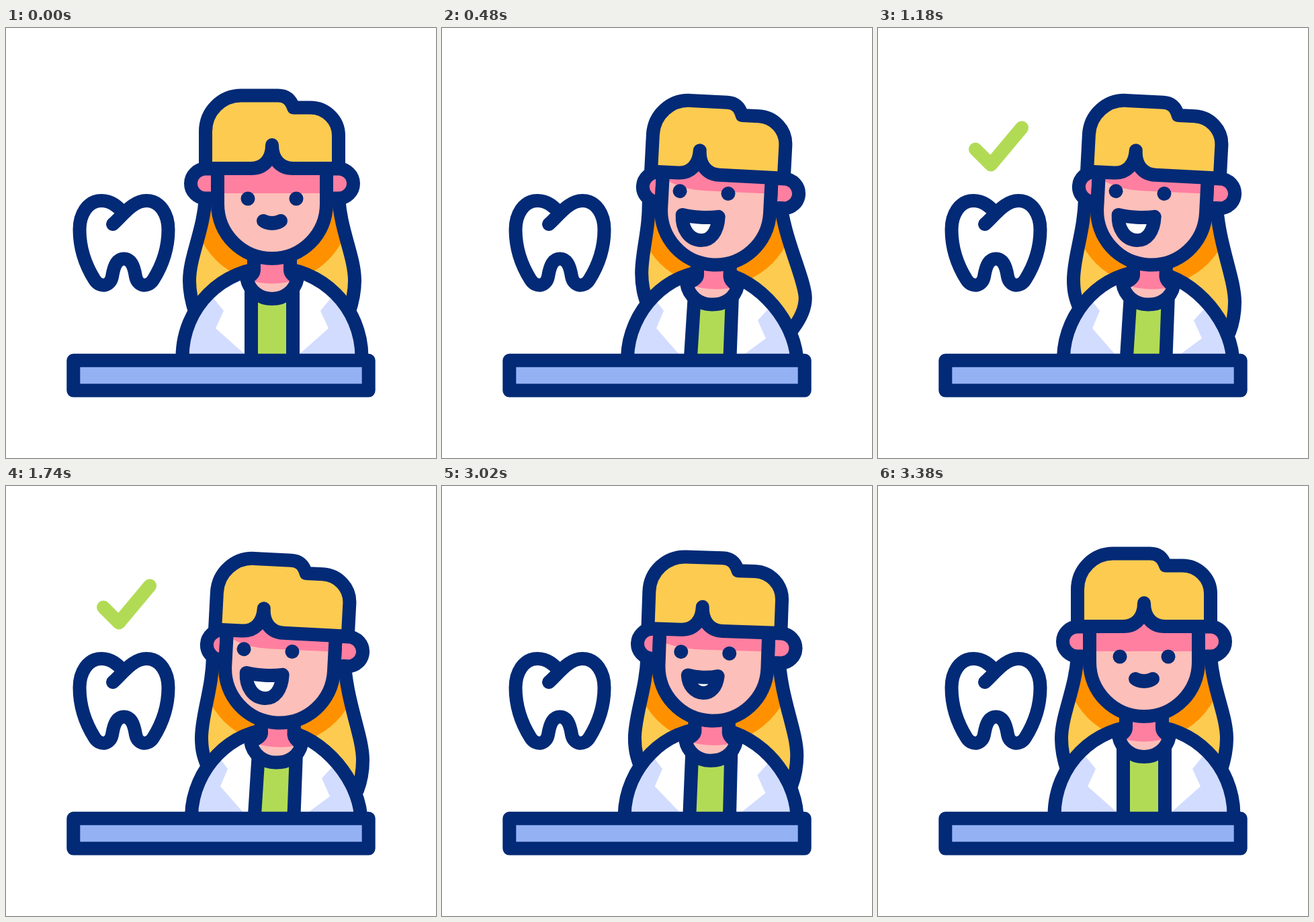
These frames come from a looping animation (640x640 px, 3.6 s). An HTML page:

```html
<!DOCTYPE html>
<html lang="en">
<head>
<meta charset="utf-8">
<title>Dentist</title>
<style>
  html, body { margin: 0; width: 100%; height: 100%; overflow: hidden; background: #fff; }
  svg { display: block; width: 100vw; height: 100vh; }
  path, circle { stroke-linecap: round; stroke-linejoin: round; }
  .line { stroke: #032a76; stroke-width: 20; }
</style>
</head>
<body>
<svg viewBox="0 0 640 640">
  <defs><clipPath id="hairClip"><path id="hairMask"/></clipPath></defs>
  <g id="back"></g>
  <g id="body"></g>
  <g id="head"></g>
  <path class="line" fill="#94b1f4" d="M100.3 494.8H539.7V539.6H100.3Z"/>
  <path id="tooth" fill="none" d="M159 292C172 281 188 257 209 257C230 257 241.5 278 241.5 300C241.5 330 231 356 219 375C211 387 196 385 193 370C190 352 185 343.5 175.5 343.5C166 343.5 161 352 158 370C155 385 140 387 132 375C120 356 109.5 330 109.5 300C109.5 278 121 257 142 257C157 257 166 266 174 274"/>
  <path id="check" fill="none" stroke-width="20" pathLength="100" d="M145 180.5L168 203.5L214 148.5"/>
</svg>
<script>
const LOOP = 3600;
const NAVY = [3, 42, 118], GREEN = [178, 219, 85];
const SKIN = '#fdbfb9', PINK = '#ff7fa0', YELLOW = '#fdcb50', ORANGE = '#ff9100',
      SHADE = '#d2dcff', LEAF = `rgb(${GREEN})`;

const $ = id => document.getElementById(id);
const lerp = (a, b, p) => a + (b - a) * p;
const ease = (t, from, to) => {
  const x = Math.min(1, Math.max(0, (t - from) / (to - from)));
  return x * x * (3 - 2 * x);
};
const NUMBER = /-?\d+(\.\d+)?/g;
// Blend two paths that share the same commands (no arcs: their flags must stay whole).
const morph = (a, b, p) => {
  const ends = b.match(NUMBER);
  let i = 0;
  return a.replace(NUMBER, n => lerp(+n, +ends[i++], p).toFixed(2));
};

const add = (group, tag, attrs) => {
  const el = document.createElementNS('http://www.w3.org/2000/svg', tag);
  for (const key in attrs) el.setAttribute(key, attrs[key]);
  return $(group).appendChild(el);
};

const parts = [];
const part = (group, fill, outlined, rest, turned) => {
  const el = add(group, 'path', { fill, class: outlined ? 'line' : '' });
  parts.push({ el, rest, turned });
};

// Long hair behind the shoulders
const HAIR = {
  rest: 'M297 250C295 300 273 340 273 376C273 395 277 410 282 425L510 425C515 410 519 395 519 376C519 340 497 300 495 250Z',
  swing: 'M308 250C310 300 298 330 298 365C298 385 302 398 306 410L523 448C533 435 541.5 420 541.5 403C541.5 375 507 310 503 250Z',
  turned: 'M308 250C308 300 291 340 291 375C291 395 295 405 300 418L523 453C528 440 531 425 531 408C531 370 505 320 503 250Z'
};
const hairFill = add('back', 'path', { fill: YELLOW });
const hairShade = add('back', 'circle', { r: 118, fill: ORANGE, 'clip-path': 'url(#hairClip)' });
const hairLine = add('back', 'path', { fill: 'none', class: 'line' });

// Coat, shirt and neck
const coat = [
  'M262.5 497V490C262.5 416 322 356.5 396 356.5C470 356.5 529.5 416 529.5 490V497',
  'M276 497V490C278 420 336 362 400 362C462 365 522 428 528 490V497'
];
part('body', '#fff', false, ...coat);
part('body', SHADE, false,
  'M303 395L324 421L312 447L357 487L262 490C263 450 279 417 303 395Z',
  'M312 397L330 421L319 447L354 487L276 490C278 450 292 419 312 397Z');
part('body', SHADE, false,
  'M489 395L468 421L480 447L435 487L530 490C529 450 513 417 489 395Z',
  'M492 411L470 435L482 462L448 487L528 490C525 457 512 431 492 411Z');
part('body', 'none', true, ...coat);
part('body', LEAF, true,
  'M365 490L365 386L427 386L427 490',
  'M370 490L376 396L432 396L428.5 490');
const neck = [
  'M369 340L369 360Q369 367 358 372C362 392 378 403 396 403C414 403 430 392 434 372Q423 367 423 360L423 340',
  'M380 345L380 368Q379 375 364 380C367 400 384 411.5 401 411.5C419 412 436 403 440 384Q429 377 428.5 370L429 345'
];
part('body', SKIN, false, ...neck);
part('body', PINK, false,
  'M369 340L369 360Q369 367 358 374Q396 387 434 374Q423 367 423 360L423 340Z',
  'M380 345L380 368Q379 375 364 381Q401 394 440 385Q429 377 428.5 370L429 345Z');
part('body', 'none', true, ...neck);

// Head, in its own upright coordinates
part('head', PINK, true,
  'M315 209.5H297C285 209.5 275 219.5 275 231.5C275 243.5 285 253.5 297 253.5H315Z',
  'M315 209.5H308C296 209.5 286 219.5 286 231.5C286 243.5 296 253.5 308 253.5H315Z');
part('head', PINK, true,
  'M477 209.5H495C507 209.5 517 219.5 517 231.5C517 243.5 507 253.5 495 253.5H477Z',
  'M477 209.5H496.5C508.5 209.5 518.5 219.5 518.5 231.5C518.5 243.5 508.5 253.5 496.5 253.5H477Z');
const face = 'M315 205V262C315 306.7 351.3 343 396 343C440.7 343 477 306.7 477 262V205';
part('head', SKIN, false, face, face);
part('head', PINK, false,
  'M315 205L315 246C335 246 355 246 385 246L477 246L477 205Z',
  'M315 205L315 217C335 229 355 233.5 385 233.5L477 233L477 205Z');
part('head', 'none', true, face, face);
part('head', YELLOW, true,
  'M297 209V154C297 124 321 100.5 350 100.5H405C417 100.5 424 107 428 118.5H453C476 118.5 495 137 495 160V209H427C407 209 396 194 396 174C396 194 385 209 365 209Z',
  'M297 209V154C297 124 321 100.5 350 100.5H405C417 100.5 424 107 428 118.5H453C476 118.5 495 137 495 160V209H399C379 209 368 194 368 174C368 194 357 209 337 209Z');
part('head', '#fff', true,
  'M383 287C390 291 402 291 409 287C405 290.5 400 291 396 291C392 291 387 290.5 383 287Z',
  'M347 271C363 274 385 274 401 271C401 294 391 307.5 376 307.5C359 307.5 347 292 347 271Z');
const eyes = [360, 432].map(x => ({ x, el: add('head', 'circle', { r: 10.5, fill: `rgb(${NAVY})` }) }));

// Colour swap between tooth and tick: [time, amount]
const SWAPS = [[0, 0], [1460, 1], [1720, .5], [1740, 0], [2000, .5], [2020, 1], [2300, 0], [2580, 1], [2860, 0]];
const blend = (a, b, p) => `rgb(${a.map((v, i) => Math.round(lerp(v, b[i], p)))})`;

const hairAt = t => {
  if (t < 540) return morph(HAIR.rest, HAIR.swing, ease(t, 0, 540));
  if (t < 1080) return morph(HAIR.swing, HAIR.turned, ease(t, 540, 1080));
  return morph(HAIR.turned, HAIR.rest, ease(t, 2860, 3380));
};

function draw(t) {
  const turn = ease(t, 0, 420) - ease(t, 2860, 3280);
  for (const { el, rest, turned } of parts) el.setAttribute('d', morph(rest, turned, turn));
  $('head').setAttribute('transform',
    `translate(${13.9 * turn} ${9.65 * turn}) rotate(${3 * turn} 396 209)`);
  for (const { x, el } of eyes) {
    el.setAttribute('cx', x - 18.5 * turn);
    el.setAttribute('cy', 254 - 18 * turn);
  }

  const hair = hairAt(t);
  for (const el of [hairFill, hairLine, $('hairMask')]) el.setAttribute('d', hair);
  hairShade.setAttribute('cx', 396 + 12 * turn);
  hairShade.setAttribute('cy', 262 + 5 * turn);

  const swap = SWAPS.filter(([time]) => time <= t).pop()[1];
  $('tooth').setAttribute('stroke', blend(NAVY, GREEN, swap));
  $('tooth').setAttribute('stroke-width', 20 + 3 * swap);

  const drawn = 100 * ease(t, 840, 1180);
  const check = $('check');
  check.setAttribute('stroke', blend(GREEN, NAVY, swap));
  check.setAttribute('stroke-dasharray', drawn < 100 ? `${drawn} 200` : 'none');
  check.setAttribute('visibility', drawn > 0 && t < 2860 ? 'visible' : 'hidden');
}

const start = performance.now();
function tick() {
  draw((performance.now() - start) % LOOP);
  requestAnimationFrame(tick);
}
tick();
</script>
</body>
</html>
```
